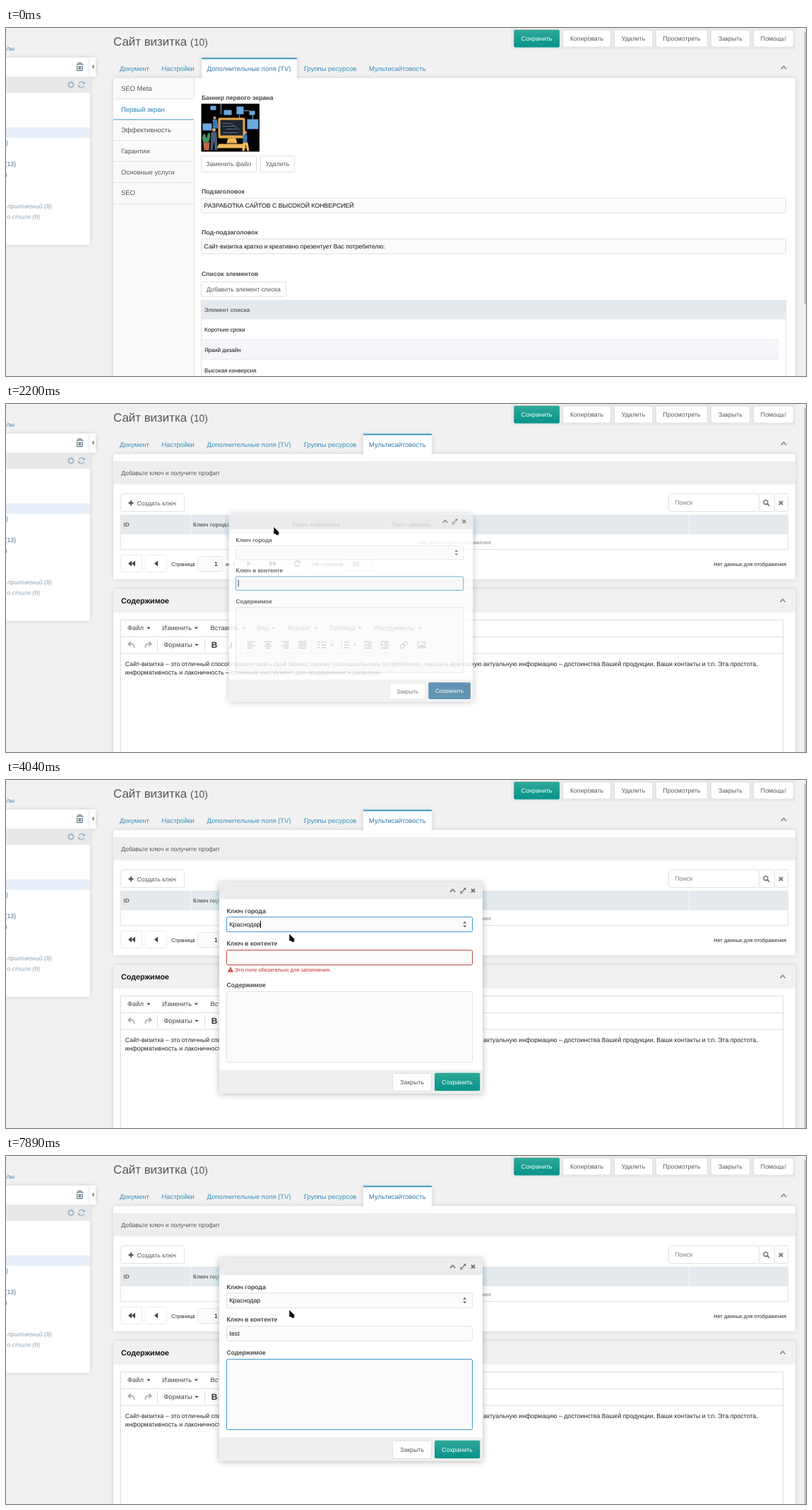
An HTML page that plays this animation: 1133 by 494 pixels, repeating every 8 s.

```html
<!DOCTYPE html>
<html lang="ru">
<head>
<meta charset="utf-8">
<title>Сайт визитка</title>
<style>
html, body { margin: 0; width: 100%; height: 100%; overflow: hidden; background: #f1f1f1; }
svg { display: block; }
text { font-family: "Liberation Sans", Arial, sans-serif; text-rendering: geometricPrecision; white-space: pre; }
.shade { filter: drop-shadow(0 0 3px rgba(0,0,0,.13)); }
.float { filter: drop-shadow(0 1px 5px rgba(0,0,0,.28)); }
</style>
</head>
<body>
<svg id="stage" width="1133" height="494" viewBox="0 0 1133 494">
  <defs>
    <linearGradient id="green" x2="0" y2="1">
      <stop stop-color="#2fa998"/><stop offset="1" stop-color="#04938a"/>
    </linearGradient>
  </defs>
</svg>
<script>
const LOOP = 8000, BASE = 8.78, SMALL = 7.45, CELL = 8.15, NAV = 9.45;
const LINE = '#e2e2e2', FOCUS = '#3f97c8', ERROR = '#c0443e', LINK = '#338fc6', INK = '#555', DARK = '#111';
const stage = document.getElementById('stage');

function add(parent, tag, attrs = {}) {
  const node = document.createElementNS('http://www.w3.org/2000/svg', tag);
  for (const k in attrs) node.setAttribute(k, attrs[k]);
  parent.appendChild(node);
  return node;
}
const group = (parent, attrs) => add(parent, 'g', attrs);
// y is the middle of the capitals
function text(parent, x, y, str, size = BASE, fill = INK, extra = {}) {
  const node = add(parent, 'text', { x, y: y + size * .36, 'font-size': size, fill, ...extra });
  node.textContent = str;
  return node;
}
const bold = (parent, x, y, str, size = BASE, fill = '#484848') =>
  text(parent, x, y, str, size, fill, { 'font-weight': 700 });
const box = (parent, x, y, w, h, fill, extra = {}) =>
  add(parent, 'rect', { x, y, width: w, height: h, fill, ...extra });
const frame = (parent, x, y, w, h, fill = '#fff', stroke = LINE, rx = 2) =>
  box(parent, x + .5, y + .5, w - 1, h - 1, fill, { stroke, rx });
const line = (parent, d, stroke = '#777', width = 1, extra = {}) =>
  add(parent, 'path', { d, stroke, 'stroke-width': width, fill: 'none', ...extra });
const shape = (parent, d, fill = '#444', extra = {}) => add(parent, 'path', { d, fill, ...extra });
const disc = (parent, cx, cy, r, fill) => add(parent, 'circle', { cx, cy, r, fill });

function button(parent, x, y, w, h, label) {
  const g = group(parent);
  g.face = frame(g, x, y, w, h, '#fff', '#e0e0e0');
  text(g, x + w / 2, y + h / 2, label, BASE, INK, { 'text-anchor': 'middle' });
  return g;
}
function primary(parent, x, y, w, h, label) {
  const g = group(parent);
  g.face = box(g, x, y, w, h, 'url(#green)', { rx: 2 });
  text(g, x + w / 2, y + h / 2, label, BASE, '#fff', { 'text-anchor': 'middle' });
  return g;
}
const chevron = (parent, x, y, color = '#888') =>
  line(parent, `M${x - 3.5} ${y + 2}l3.5 -3.8l3.5 3.8`, color, 1.7);
const cross = (parent, x, y, color = '#777') =>
  line(parent, `M${x - 2.5} ${y - 2.5}l5 5m0 -5l-5 5`, color, 1.9);
// dir 1 points right, -1 points left
const triangle = (parent, x, y, dir, color = '#444') =>
  shape(parent, `M${x - 2.5 * dir} ${y - 4}v8l${5 * dir} -4z`, color);
const caretDown = (parent, x, y) => shape(parent, `M${x - 2.7} ${y - 1.3}h5.4l-2.7 2.8z`);
function spin(parent, x, y, r, color) {
  line(parent, `M${x + r * .8} ${y - r * .6}A${r} ${r} 0 1 0 ${x + r} ${y + r * .3}`, color, 1.6);
  shape(parent, `M${x + r + 1} ${y - r - 1}v4h-4z`, color);
}

function buildShell(p) {
  text(p, .5, 29, 'лы', BASE, LINK);
  box(p, 0, 42, 119, 266, '#fff', { class: 'shade' });
  box(p, 0, 69, 119, 23, '#e9e9e9');
  box(p, 0, 141, 119, 15, '#e6eff7');
  box(p, 119, 42, 8, 27, '#fff', { class: 'shade' });
  shape(p, 'M124.7 52v6l-3.2 -3z', '#777');
  line(p, 'M99.5 51.5h10M102.5 51v-1.5h4v1.5M100.7 53v7.5h7.6v-7.5M103 54v5M104.5 54v5M106 54v5', '#536a79', 1);
  disc(p, 92, 80.5, 4.7, '#a5bcc8');
  line(p, 'M89.5 80.5h5M92 78v5', '#fff', 1.3);
  line(p, 'M103.3 79a4 4 0 0 1 7.2 -.8M110.7 82a4 4 0 0 1 -7.2 .8', '#a5bcc8', 1.5);
  shape(p, 'M112 76v4h-4zM102 85v-4h4z', '#a5bcc8');
  text(p, 0, 163, ')', BASE, '#456f91');
  text(p, -1.5, 193, '(13)', BASE, '#456f91');
  text(p, -1.5, 208, ')', BASE, '#456f91');
  text(p, 2, 253, 'приложений (8)', BASE, '#8ba6bb', { 'font-style': 'italic' });
  text(p, 1.5, 268, 'о стиля (9)', BASE, '#8ba6bb', { 'font-style': 'italic' });

  text(p, 152, 19, 'Сайт визитка', 16.9, INK);
  text(p, 261, 20, '(10)', 14.1, INK);
  box(p, 715, -4, 403, 35, '#e9e9e9', { rx: 3 });
  primary(p, 719.3, 2.5, 64.7, 25, 'Сохранить');
  for (const [x, w, s] of [[788, 69, 'Копировать'], [861, 55, 'Удалить'], [920, 74, 'Просмотреть'],
    [998, 56, 'Закрыть'], [1058, 58, 'Помощь!']]) button(p, x, 2.5, w, 25, s);
  chevron(p, 1101.5, 56);
}

function tabs(p, active) {
  const list = [[161, 'Документ'], [220.5, 'Настройки'], [284.5, 'Дополнительные поля (TV)'],
    [422, 'Группы ресурсов'], [514, 'Мультисайтовость']];
  const [x, w] = active === 2 ? [277, 135] : [506, 97];
  box(p, x, 43, w, 29, '#fff', { class: 'shade' });
  box(p, x - 1, 71, w + 2, 6, '#fff');
  box(p, x, 42.3, w, 2, FOCUS);
  list.forEach(([tx, s], i) => text(p, tx, 58, s, NAV, i === active ? '#2f7cae' : LINK));
}

function buildPicture(p) {
  const g = group(p, { transform: 'translate(276.5 107.5)' });
  box(g, 0, 0, 82.5, 68, '#000');
  for (const [x, y, w, h] of [[13, 3, 8, 6], [32, 9, 11, 7], [50, 4, 10, 11], [68, 10, 8, 6], [2, 28, 13, 10], [65, 22, 16, 14]])
    box(g, x, y, w, h, '#6aa8dd');
  line(g, 'M28 0v15M54 16v10M16 32h8M60 10h8M73 16v6', '#9cc8ea', .9);
  box(g, 24, 20, 38, 29, '#e9a84a', { rx: 2 });
  box(g, 27, 23, 32, 22, '#20262e');
  line(g, 'M30 28h12M30 32h18M36 36h14M42 28l12 9M31 41h21', '#5f86ac', .8);
  shape(g, 'M38 49h11l2 7h-15zM25 57h35l4 6h-42z', '#f0ba5c');
  shape(g, 'M3 55q-4 -9 2 -13q1 5 3 7q0 -7 4 -8q2 8 -2 14z', '#41955d');
  shape(g, 'M3 55h9l-1 11h-7z', '#bd6746');
  disc(g, 18, 37, 2.5, '#d5a07b'); shape(g, 'M14 40h8l1 26h-4l-1 -13l-2 13h-3z', '#485b76');
  disc(g, 19, 20, 2, '#d5a07b'); shape(g, 'M16 22h6l3 13h-8z', '#3878b3');
  disc(g, 62, 41, 2.5, '#d5a07b'); shape(g, 'M59 44h6v11h-6z', '#377dbc');
  shape(g, 'M59 55h7l2 12h-3l-2 -9l-2 9h-3z', '#f0ba5c');
}

function buildFields(p) {
  box(p, 152, 71, 966, 430, '#fff', { class: 'shade' });
  tabs(p, 2);
  box(p, 152, 71, 114, 423, '#fafafa');
  box(p, 152, 100, 115, 30, '#fff');
  line(p, 'M266.5 71V100M266.5 130V494M152 100.5h114M152 159.5h114M152 189.5h114M152 219.5h114M152 249.5h114', LINE);
  line(p, 'M152 130h114', FOCUS, 1.2);
  ['SEO Meta', 'Первый экран', 'Эффективность', 'Гарантии', 'Основные услуги', 'SEO'].forEach((s, i) =>
    text(p, 163, 85.5 + i * 29.7, s, NAV, i === 1 ? '#2484b8' : INK));
  bold(p, 277, 98.5, 'Баннер первого экрана');
  buildPicture(p);
  button(p, 276, 181, 79, 24, 'Заменить файл');
  button(p, 360, 181, 49, 24, 'Удалить');
  bold(p, 277, 231.5, 'Подзаголовок');
  frame(p, 276, 241, 829, 22, '#fbfbfb');
  text(p, 280.5, 251.5, 'РАЗРАБОТКА САЙТОВ С ВЫСОКОЙ КОНВЕРСИЕЙ', 8.72, DARK);
  bold(p, 277, 290, 'Под-подзаголовок');
  frame(p, 276, 299, 829, 22, '#fbfbfb');
  text(p, 280.5, 310, 'Сайт-визитка кратко и креативно презентует Вас потребителю:', 8.72, DARK);
  bold(p, 277, 348.5, 'Список элементов');
  button(p, 276, 360, 121, 22, 'Добавить элемент списка');
  frame(p, 276, 386, 829, 120, '#fff', LINE, 0);
  box(p, 277, 386, 827, 27.5, '#e4e9ee');
  bold(p, 281, 400, 'Элемент списка', CELL, '#666');
  box(p, 277, 442, 818, 29, '#f5f6fa');
  line(p, 'M277 442.5h818M277 470.5h818', '#ececf0');
  ['Короткие сроки', 'Яркий дизайн', 'Высокая конверсия'].forEach((s, i) =>
    text(p, 281, 428 + i * 28.8, s, CELL, DARK));
  box(p, 1130.5, 5, 2.5, 387, '#c3c3c3', { rx: 1 });
}

function buildEditor(p) {
  frame(p, 162, 306, 939, 200, '#fff', '#dcdcdc', 0);
  line(p, 'M163 330.5h937M163 354H1100M214.5 333v18M281.5 333v18M332.5 333v18M432.5 333v18M549.5 333v18', '#e0e0e0');
  for (const [x, c, s] of [[172, 202, 'Файл'], [221, 269.5, 'Изменить'], [289.5, 336.5, 'Вставить'], [355, 379, 'Вид'],
    [398, 438.5, 'Формат'], [458, 501, 'Таблица'], [520.5, 586, 'Инструменты']]) {
    text(p, x, 318, s, 9.35, '#444');
    caretDown(p, c, 318);
  }
  line(p, 'M174 340.5h4q4 0 3.5 5.5', '#aaa', 1.7); shape(p, 'M172 340.5l4.5 -4v8z', '#aaa');
  line(p, 'M205 340.5h-4q-4 0 -3.5 5.5', '#aaa', 1.7); shape(p, 'M207 340.5l-4.5 -4v8z', '#aaa');
  text(p, 223.5, 342, 'Форматы', 9.35, '#444');
  caretDown(p, 270, 342);
  bold(p, 290.7, 342, 'B', 12, '#333');
  text(p, 317, 342, 'I', 13, '#333', { 'font-style': 'italic', 'font-family': 'Liberation Serif, serif', 'font-weight': 700 });
  [[0, 0], [2, 2], [4, 4], [0, 0]].forEach(([shift], i) => {
    const x = 341.5 + i * 24.2, short = i < 3 ? 7 : 11;
    line(p, `M${x} 337.5h11M${x + shift} 340.5h${short}M${x} 343.5h11M${x + shift} 346.5h${short}`, '#333', 1.3);
  });
  for (const x of [442, 475]) {
    line(p, `M${x + 4} 338h7.5M${x + 4} 342h7.5M${x + 4} 346h7.5`, '#333', 1.3);
    caretDown(p, x + 19, 342);
  }
  for (const y of [338, 342, 346]) disc(p, 443, y, 1.2, '#333');
  [1, 2, 3].forEach(n => text(p, 474, 334 + n * 4, n, 4.5, '#333'));
  [[507, 1], [531, -1]].forEach(([x, dir]) => {
    line(p, `M${x} 337.5h11M${x + 5} 340.5h6M${x + 5} 343.5h6M${x} 346.5h11`, '#333', 1.3);
    shape(p, dir > 0 ? `M${x} 342l3.5 -2.5v5z` : `M${x + 3.5} 342l-3.5 -2.5v5z`);
  });
  const link = group(p, { transform: 'rotate(-45 563.5 342)' });
  for (const x of [557.5, 563.5]) box(link, x, 339.8, 6, 4.4, 'none', { rx: 2.2, stroke: '#444', 'stroke-width': 1.2 });
  frame(p, 583, 337, 11, 10, '#fff', '#444', 0);
  shape(p, 'M584.5 345.5l3 -4l2 2l1.5 -1.5l2 3.5z');
  disc(p, 590.8, 340, .9, '#444');
  text(p, 168.8, 368.5, 'Сайт-визитка – это отличный способ презентовать свой бизнес своему потенциальному потребителю, показать всю самую актуальную информацию – достоинства Вашей продукции, Ваши контакты и т.п. Эта простота,', 8.81, '#222');
  text(p, 168.8, 380.8, 'информативность и лаконичность – отличный инструмент для продвижения и развития.', 8.81, '#222');
}

function buildKeys(p) {
  box(p, 152, 71, 966, 178, '#fff', { class: 'shade' });
  tabs(p, 4);
  box(p, 152, 81, 966, 33, '#eeeeee');
  text(p, 163, 98, 'Добавьте ключ и получите профит', 8.75, INK);
  p.create = frame(p, 162, 127, 91, 26);
  line(p, 'M173.5 140.5h7M177 137v7', '#444', 1.8);
  text(p, 185.5, 140.5, 'Создать ключ', 8.75, INK);
  frame(p, 938, 127, 129, 26);
  text(p, 947, 140, 'Поиск', 9.2, '#888');
  frame(p, 1066, 127, 23, 26);
  frame(p, 1088, 127, 20, 26);
  add(p, 'circle', { cx: 1076, cy: 139.5, r: 3, fill: 'none', stroke: '#777', 'stroke-width': 1.4 });
  line(p, 'M1078.3 142l2.7 2.7', '#777', 1.8);
  cross(p, 1097.5, 140.5);
  frame(p, 162, 157, 946, 50, '#fff', LINE, 0);
  box(p, 163, 157, 944, 28, '#e4e9ee');
  line(p, 'M261.5 157v28M402.5 157v28M543.5 157v28M967.5 157v28', '#f8f8f8');
  for (const [x, s] of [[166.5, 'ID'], [265, 'Ключ города'], [406, 'Ключ в контенте'], [547, 'Текст замены']])
    bold(p, x, 171, s, CELL, '#666');
  text(p, 584, 196, 'Нет данных для отображения', SMALL, '#888');

  for (const x of [162, 197, 328, 363, 397]) frame(p, x, 214, 31, 25, '#fff', '#ececec');
  for (const [x, dir] of [[175.5, -1], [180.5, -1], [212.5, -1], [344, 1], [376, 1], [381, 1]])
    triangle(p, x, 226.5, dir);
  spin(p, 412, 226.5, 3.8, '#444');
  text(p, 234, 227.5, 'Страница', SMALL, '#222');
  frame(p, 271, 216, 36, 22, '#fbfbfb');
  text(p, 300, 227, '1', BASE, DARK, { 'text-anchor': 'end' });
  text(p, 311, 227.5, 'из 1', SMALL, '#222');
  text(p, 434, 227.5, 'На странице:', SMALL, '#222');
  frame(p, 483, 216, 36, 22, '#fbfbfb');
  text(p, 490.5, 227, '20', BASE, DARK);
  text(p, 1105, 227.5, 'Нет данных для отображения', SMALL, '#222', { 'text-anchor': 'end' });

  box(p, 152, 263, 966, 240, '#fff', { class: 'shade' });
  box(p, 152, 263, 966, 33, '#f1f1f1');
  bold(p, 163, 279, 'Содержимое', 10.75, '#111');
  chevron(p, 1100, 279);
  buildEditor(p);
  box(p, 1130.5, 5, 2.5, 490, '#c3c3c3', { rx: 1 });
}

function buildDialog(p) {
  const ui = {};
  box(p, 297, 157, 383, 28, '#c6eff8', { opacity: .5 });
  ui.sheet = box(p, 302, 145, 373, 288, '#fff', { rx: 3, class: 'float' });
  box(p, 302, 145, 373, 24, '#ececec', { rx: 3 });
  chevron(p, 632.5, 157, '#777');
  line(p, 'M645 159.5l5 -5', '#777', 1.2);
  shape(p, 'M647.5 153h3.8v3.8zM643.2 157.5v3.8h3.8z', '#777');
  cross(p, 661.5, 157);
  bold(p, 312.5, 185.5, 'Ключ города');
  ui.city = frame(p, 312, 194, 349, 22, '#fbfbfb');
  ui.cityText = text(p, 316.5, 205, '', BASE, DARK);
  shape(p, 'M647 203.8h5.4l-2.7 -3.2zM647 206.2h5.4l-2.7 3.2z', '#777');
  bold(p, 312.5, 232, 'Ключ в контенте');
  ui.key = frame(p, 312, 241, 349, 22, '#fbfbfb');
  ui.keyText = text(p, 316.5, 251.8, '', BASE, DARK);
  ui.error = group(p);
  shape(ui.error, 'M318 265.2l4 7.3h-8z', '#cf2420');
  line(ui.error, 'M318 267.8v2.3M318 270.8v1', '#fff', 1);
  text(ui.error, 324, 269.6, 'Это поле обязательно для заполнения.', SMALL, '#cf2420');
  const low = ui.low = group(p);
  bold(low, 312.5, 279, 'Содержимое');
  ui.area = frame(low, 312, 288, 349, 101, '#fbfbfb');
  box(low, 302, 399.5, 373, 33.5, '#efefef');
  button(low, 547, 404, 56, 26, 'Закрыть');
  ui.save = primary(low, 607, 403.8, 64.3, 25.4, 'Сохранить').face;
  const list = ui.list = group(p);
  frame(list, 312, 215, 349, 59, '#fff', FOCUS, 0);
  box(list, 313, 216, 347, 18.5, '#e8f0f7');
  [['Краснодар', '(krd)', 366], ['Санкт-Петербург', '(spb)', 392.5], ['Москва', '(moscow)', 351]].forEach(([s, code, x], i) => {
    bold(list, 316.5, 225.3 + i * 19, s);
    text(list, x, 225.8 + i * 19, code, SMALL, INK);
  });
  line(list, 'M654 278l3.5 -3.5M656 278l1.5 -1.5', '#777', .9);
  ui.caret = box(p, 0, 0, 1, 10.5, '#000');
  return ui;
}

const layer = () => group(stage);
buildShell(layer());
const fields = layer(), keys = layer(), dialog = layer(), pointer = layer();
buildFields(fields);
buildKeys(keys);
const ui = buildDialog(dialog);
const arrow = shape(pointer, 'M0 0V10.5L2.5 10.5L4 12.2L7.3 12L7.8 8Z', '#0a0a0a', { stroke: '#fff', 'stroke-width': .6 });
const hand = shape(pointer, 'M0 .8q1 -1.6 2.2 0l1.3 3.4q2.5 -.6 4.8 1.2l.9 4.3l-1.2 3.3h-5l-4.2 -4q-.5 -1.6 1.4 -1.2l1.4 .5z',
  '#0a0a0a', { stroke: '#fff', 'stroke-width': .6 });

// [time, x, y] of the pointer
const PATH = [[680, 640, 494], [900, 553, 57], [1000, 550, 57], [1280, 276, 142], [1480, 232, 140], [1760, 232, 140],
  [2200, 379, 174], [2300, 430, 188], [2340, 430, 188], [2800, 505, 204], [3180, 505, 204], [3390, 461, 226],
  [3580, 440, 228], [3740, 440, 228], [4000, 401, 218]];
// [time, value] steps
const KEY_TEXT = [[0, ''], [5130, 'е'], [5230, 'еу'], [5330, 'еуы'], [5420, 'еуые'], [5780, 'еуы'], [5830, 'еу'], [5880, 'е'],
  [5940, ''], [6230, 't'], [6330, 'te'], [6430, 'tes'], [6540, 'test']];
const CARET = [[0, 'key'], [2860, 'city'], [4050, 'key'], [4590, ''], [5130, 'key'], [7140, ''], [7320, 'area'], [7890, '']];

const clamp = v => Math.max(0, Math.min(1, v));
const between = (t, a, b) => t >= a && t < b;
const show = (node, on) => node.setAttribute('visibility', on ? 'inherit' : 'hidden');
const at = (steps, t) => steps.filter(s => s[0] <= t).pop()[1];
const rgb = hex => [1, 3, 5].map(i => parseInt(hex.slice(i, i + 2), 16));
function mix(a, b, k) {
  const to = rgb(b);
  return `rgb(${rgb(a).map((v, i) => Math.round(v + (to[i] - v) * k))})`;
}
function pointerAt(t) {
  const i = PATH.findIndex(s => s[0] > t);
  if (i < 0) return PATH[PATH.length - 1].slice(1);
  const [t0, x0, y0] = PATH[i - 1], [t1, x1, y1] = PATH[i];
  const k = (1 - Math.cos(Math.PI * (t - t0) / (t1 - t0))) / 2;
  return [x0 + (x1 - x0) * k, y0 + (y1 - y0) * k];
}

function drawDialog(t) {
  const k = 1 - (1 - clamp((t - 2100) / 200)) ** 2;
  const scale = .7 + .3 * k;
  dialog.setAttribute('transform', `translate(488.5 289) scale(${scale}) translate(-488.5 -289)`);
  dialog.setAttribute('opacity', Math.min(1, k * 1.07));

  const invalid = between(t, 2900, 5730);
  show(ui.error, invalid);
  ui.low.setAttribute('transform', `translate(0 ${invalid ? 12 : 0})`);
  ui.sheet.setAttribute('height', invalid ? 300 : 288);
  show(ui.list, between(t, 3000, 3740));
  ui.save.setAttribute('fill', t < 2300 ? '#3f7ba3' : 'url(#green)');

  const fade = start => clamp((t - start) / 210);
  const pick = (node, color) => node.setAttribute('stroke', color);
  pick(ui.city, mix(LINE, FOCUS, fade(2860) - fade(4080)));
  pick(ui.key, invalid ? mix(FOCUS, ERROR, fade(2900))
    : t < 2900 ? FOCUS
    : t < 7320 ? mix(ERROR, FOCUS, fade(5730)) : mix(FOCUS, LINE, fade(7320)));
  pick(ui.area, mix(LINE, FOCUS, fade(7320)));

  ui.cityText.textContent = t >= 3740 ? 'Краснодар' : '';
  ui.keyText.textContent = at(KEY_TEXT, t);
  const place = at(CARET, t);
  const spot = { city: [ui.cityText, 199.8], key: [ui.keyText, 246.5], area: [null, 293] }[place];
  show(ui.caret, !!spot);
  if (spot) {
    const width = spot[0] ? spot[0].getComputedTextLength() : 0;
    ui.caret.setAttribute('x', Math.floor(316.4 + width));
    ui.caret.setAttribute('y', spot[1]);
  }
}

function render(t) {
  const switched = t >= 980;
  show(fields, !switched);
  show(keys, switched);
  show(dialog, t > 2100);
  if (t > 2100) drawDialog(t);
  keys.create.setAttribute('fill', between(t, 1420, 1860) ? '#f3f3f3' : '#fff');

  const moving = t >= 680;
  show(pointer, moving);
  show(hand, false);
  show(arrow, false);
  if (!moving) return;
  const [x, y] = pointerAt(t);
  const pointing = between(t, 850, 1040) || between(t, 1420, 1860) || between(t, 3260, 3740);
  pointer.setAttribute('transform', `translate(${x} ${y})`);
  show(pointing ? hand : arrow, true);
}

const start = performance.now();
function tick() {
  render((performance.now() - start) % LOOP);
  requestAnimationFrame(tick);
}
tick();
</script>
</body>
</html>
```
